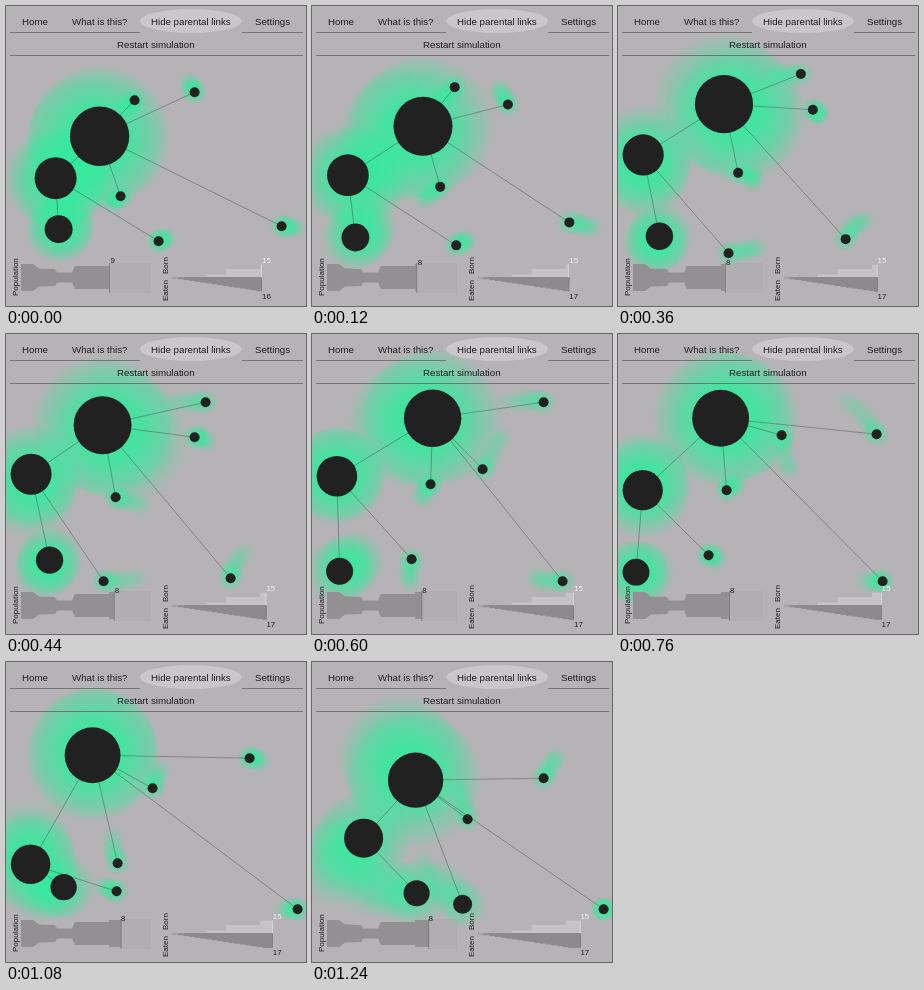
An HTML page with a canvas that plays this animation: 300x300 px, repeating every 1280 ms.

```html
<!DOCTYPE html>
<html lang="en">
<head>
<meta charset="utf-8">
<title>Cell simulation</title>
<style>
  html, body { margin: 0; width: 100%; height: 100%; overflow: hidden; background: #b5b3b5; }
  canvas, svg { position: absolute; left: 0; top: 0; width: 300px; height: 300px; }
  text { font: 9.7px "Liberation Sans", Arial, sans-serif; fill: #1e1e1e; }
  .small text { font-size: 8px; }
</style>
</head>
<body>
<canvas id="stage"></canvas>
<svg viewBox="0 0 300 300">
  <path d="M4 26.5H134M236 26.5H297M4 49.5H297" stroke="#666466" stroke-width=".8"/>
  <ellipse cx="185" cy="15" rx="51" ry="12" fill="#c9c7c9"/>
  <text x="16" y="18.5">Home</text>
  <text x="66" y="18.5">What is this?</text>
  <text x="145" y="18.5">Hide parental links</text>
  <text x="249" y="18.5">Settings</text>
  <text x="111" y="41.5">Restart simulation</text>
  <g class="small">
    <text transform="translate(12 290) rotate(-90)">Population</text>
    <text transform="translate(162 268) rotate(-90)">Born</text>
    <text transform="translate(162 295) rotate(-90)">Eaten</text>
    <text id="pop"></text>
    <text id="born" y="257" style="fill:#f4f2f4">15</text>
    <text id="eaten" y="292.5"></text>
  </g>
</svg>
<script>
const STEP = 40, STEPS = 32, TRAIL = 6;
const EATEN_AT = 2, MERGE_AT = 29;
const WALL = { left: 4, right: 296, top: 51, bottom: 252 };

// Every cell drifts smoothly through one waypoint per time
const times = [0, 6, 11, 15, 19, 27, 31];
const cells = {
  a: { r: 29.7, way: '93,130 122,110 96,91 120,84 102,84 86,93 103,118' },
  b: { r: 21, parent: 'a', way: '49,172 24,164 24,140 24,142 24,156 24,202 51,176' },
  c: { r: 14, parent: 'b', way: '52,223 36,237 43,226 27,237 17,238 57,225 104,231' },
  d: { r: 5, parent: 'a', way: '128,94 158,70 199,68 231,68 258,100 243,96 231,116' },
  e: { r: 5, parent: 'a', way: '188,86 200,108 188,103 170,135 163,101 146,126 155,157' },
  f: { r: 5, parent: 'a', way: '114,190 136,172 109,163 118,150 108,156 111,201 150,242' },
  g: { r: 5, parent: 'a', way: '275,220 240,216 224,244 250,247 264,247 291,247 291,247' },
  h: { r: 5, parent: 'b', way: '152,235 133,243 97,247 99,225 90,221 110,229 135,232' }
};
const ids = Object.keys(cells);
for (const id of ids)
  cells[id].path = cells[id].way.split(' ').map(p => p.split(',').map(Number));

const clamp = (v, lo, hi) => Math.min(hi, Math.max(lo, v));

function slope(path, i, axis) {
  const p = Math.max(0, i - 1), q = Math.min(times.length - 1, i + 1);
  return (path[q][axis] - path[p][axis]) / (times[q] - times[p]) * 0.85;
}

function along(path, s, axis) {
  if (s < 0) return path[0][axis] + s * slope(path, 0, axis) * 0.7;
  let i = 0;
  while (i < times.length - 2 && s > times[i + 1]) i++;
  const span = times[i + 1] - times[i], u = (s - times[i]) / span, v = 1 - u;
  return path[i][axis] * (1 + 2 * u) * v * v + path[i + 1][axis] * (1 + 2 * v) * u * u +
    span * u * v * (slope(path, i, axis) * v - slope(path, i + 1, axis) * u);
}

// Big cells shrink slowly; f doubles when it swallows h
function radius(id, s) {
  if (id === 'f' && s >= MERGE_AT) return 9.5;
  const { r } = cells[id];
  return r > 5 ? r * (1 - 0.0022 * Math.max(0, s)) : r;
}

function locate(id, s) {
  const { path } = cells[id], r = radius(id, s);
  return {
    x: clamp(along(path, s, 0), WALL.left + r, WALL.right - r),
    y: clamp(along(path, s, 1), WALL.top + r, WALL.bottom - r),
    r
  };
}

const alive = (id, s) => id !== 'h' || s < MERGE_AT;

const canvas = document.getElementById('stage');
const ctx = canvas.getContext('2d');
const scale = window.devicePixelRatio || 1;
canvas.width = canvas.height = 300 * scale;
ctx.scale(scale, scale);

function disc(x, y, r, fill) {
  ctx.fillStyle = fill;
  ctx.beginPath();
  ctx.arc(x, y, r, 0, 7);
  ctx.fill();
}

// Older glows are fainter and a little smaller
function glow({ x, y, r }, age) {
  const reach = r * (2.35 - 0.06 * age), strength = 1 - age / TRAIL;
  const fill = ctx.createRadialGradient(x, y, r * 0.8, x, y, reach);
  const tint = alpha => `rgba(46,236,156,${alpha * strength})`;
  fill.addColorStop(0, tint(0.48));
  fill.addColorStop(0.5, tint(0.25));
  fill.addColorStop(1, tint(0.1));
  disc(x, y, reach, fill);
}

function drawGlows(s) {
  for (let age = TRAIL - 1; age >= 0; age--)
    for (const id of ids)
      if (alive(id, s - age)) glow(locate(id, s - age), age);
}

function drawCells(s) {
  const living = ids.filter(id => alive(id, s));
  ctx.strokeStyle = 'rgba(50,58,54,.7)';
  ctx.lineWidth = 0.55;
  ctx.beginPath();
  for (const id of living.filter(id => cells[id].parent)) {
    const p = locate(cells[id].parent, s), q = locate(id, s);
    ctx.moveTo(p.x, p.y);
    ctx.lineTo(q.x, q.y);
  }
  ctx.stroke();
  for (const id of living) {
    const { x, y, r } = locate(id, s);
    disc(x, y, r, '#212121');
  }
}

function box(x0, x1, y0, y1, fill) {
  ctx.fillStyle = fill;
  ctx.fillRect(x0, y0, x1 - x0, y1 - y0);
}

function drawCharts(s) {
  const mid = 271.5, now = 103.8 + s * 0.43, end = 255.8 + s * 0.41;

  box(now, 145, 257, 287, 'rgba(150,148,150,.15)');
  const outline = [[15, 13.5], [27, 13.5], [33, 9], [49, 8.5], [51, 5], [66, 5],
    [69, 11.5], [103, 11.5], [103, 13.5], [now, 13.5]];
  ctx.fillStyle = '#929092';
  ctx.beginPath();
  outline.forEach(([x, h]) => ctx.lineTo(x, mid - h));
  outline.reverse().forEach(([x, h]) => ctx.lineTo(x, mid + h));
  ctx.fill();
  box(now - 0.8, now, 257, 287, '#7c7a7c');

  for (const [x, h] of [[200, 3], [220, 8.5], [254, 13]])
    box(x, end, mid - h, mid, '#c5c3c5');
  for (let i = 0; i < 17; i++) {
    const x = 166 + i * 5.65;
    if (x < end) box(x, end, mid, mid + (i + 1) * 0.85, '#8c8a8c');
  }
  box(end - 0.7, end, mid - 13, mid, '#dddbdd');
  box(end - 0.7, end, mid, mid + 14, '#7c7a7c');
}

const [pop, born, eaten] = ['pop', 'born', 'eaten'].map(id => document.getElementById(id));

function drawLabels(s) {
  const early = s < EATEN_AT;
  pop.textContent = early ? 9 : 8;
  pop.setAttribute('x', 104.5 + s * 0.39);
  pop.setAttribute('y', early ? 257 : 259);
  eaten.textContent = early ? 16 : 17;
  for (const el of [born, eaten]) el.setAttribute('x', 256 + s * 0.4);
}

let shown = -1;
function tick() {
  const s = Math.floor(performance.now() / STEP) % STEPS;
  if (s !== shown) {
    shown = s;
    box(0, 300, 0, 300, '#b5b3b5');
    ctx.save();
    ctx.translate(0.6, 0.2);
    drawGlows(s);
    ctx.restore();
    drawCharts(s);
    ctx.save();
    ctx.translate(0.6, 0.2);
    drawCells(s);
    ctx.restore();
    drawLabels(s);
  }
  requestAnimationFrame(tick);
}
tick();
</script>
</body>
</html>
```
